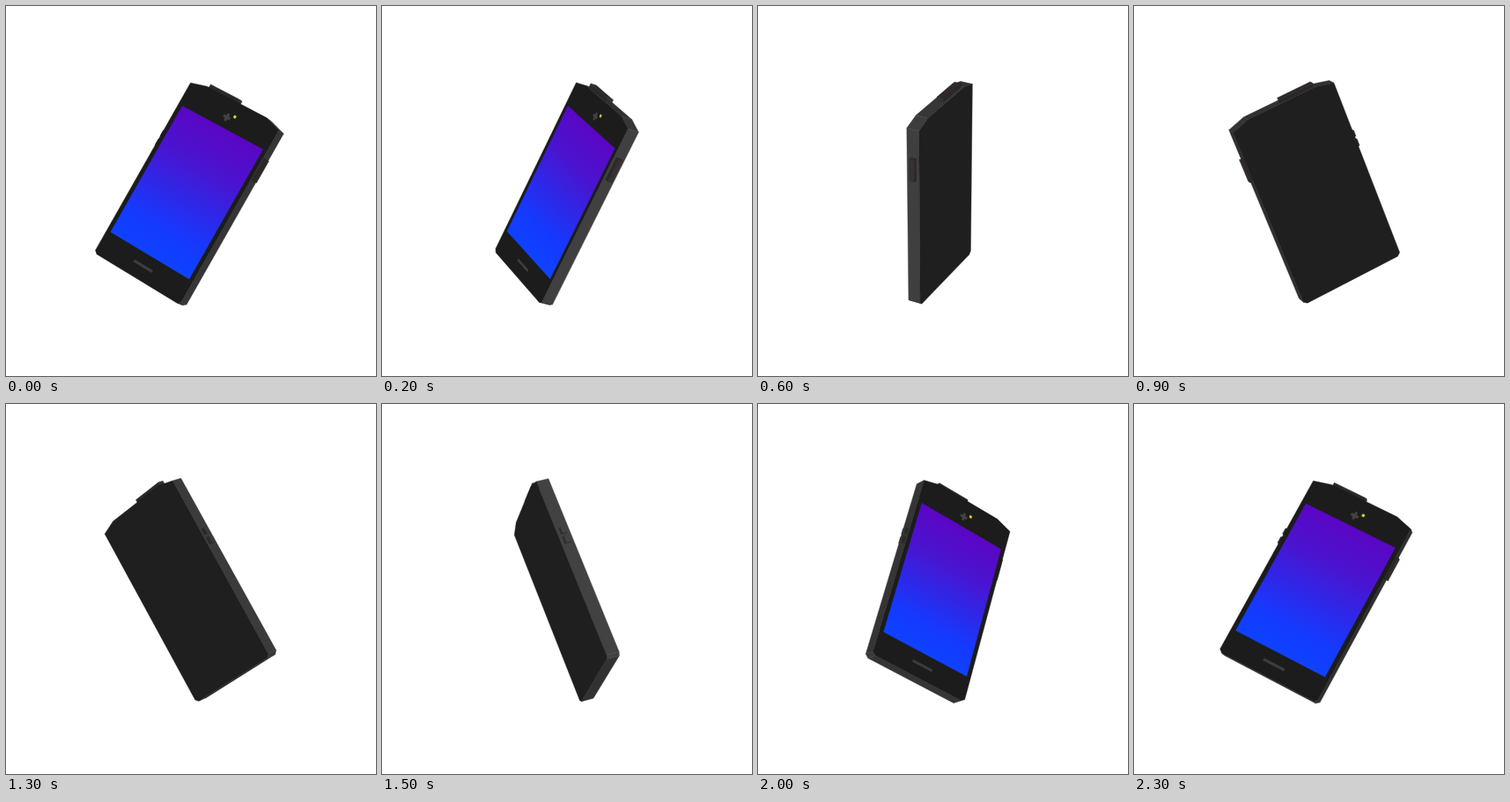
Write an HTML page with a canvas that moves like this. It is 420 px wide and 420 px high and loops after 2.4 s.

```html
<!DOCTYPE html>
<html lang="en">
<head>
<meta charset="utf-8">
<title>Rotating phone</title>
<style>
html, body { margin: 0; width: 100%; height: 100%; overflow: hidden; background: #fff; }
canvas { display: block; }
</style>
</head>
<body>
<canvas id="stage" width="420" height="420"></canvas>
<script>
const ctx = document.getElementById('stage').getContext('2d');
const LOOP = 2400, STEPS = 24;
const CX = 207, CY = 212, DIST = 1950, DEPTH = 7.5;
const ROLL = 29.6 * Math.PI / 180, YAW = 27.5 * Math.PI / 180;

// Phone axes: across, down, and front to back (z points away from the viewer).
const cr = Math.cos(ROLL), sr = Math.sin(ROLL);
const cy = Math.cos(YAW), sy = Math.sin(YAW);
const U = [cy * cr, cy * sr, -sy];
const V = [-sr, cr, 0];
const N = [sy * cr, sy * sr, cy];

const BODY = [[-64, -111], [-43, -116.3], [43, -116.3], [64, -110.4],
              [64, 110], [60, 113.2], [-60, 113.2], [-64, 110]];

const grey = nz => { const g = Math.round(40 + 30 * nz); return `rgb(${g},${g},${g})`; };
const warm = nz => { const g = Math.round(30 + 24 * nz); return `rgb(${g + 6},${g},${g})`; };

// Each button sits on the edge whose outward direction is `out`.
const BUTTONS = [
  { box: [63, -75, 67, -47.5], r: 3.2, out: [1, 0], shade: warm },
  { box: [-42, -120.5, 0, -116], r: 4, out: [0, -1], shade: warm },
  { box: [-66.8, -48, -63, -41], r: 3, out: [-1, 0], shade: grey },
  { box: [-66.8, -37, -63, -29], r: 3, out: [-1, 0], shade: grey }
];

let cos = 1, sin = 0;

const depthOf = v => -v[0] * sin + v[2] * cos;
const facing = (p, q) => -(p * depthOf(U) + q * depthOf(V));
const rect = (l, t, r, b) => [[l, t], [r, t], [r, b], [l, b]];

function project(p, q, r) {
  const [x, y, z] = [0, 1, 2].map(i => p * U[i] + q * V[i] + r * N[i]);
  const s = DIST / (DIST - x * sin + z * cos);
  return [CX + (x * cos + z * sin) * s, CY + y * s];
}

function area(pts) {
  return pts.reduce((sum, [x, y], i) => {
    const [nx, ny] = pts[(i + 1) % pts.length];
    return sum + x * ny - nx * y;
  }, 0);
}

function fill(pts, style) {
  ctx.beginPath();
  pts.forEach(([x, y]) => ctx.lineTo(x, y));
  ctx.closePath();
  ctx.fillStyle = ctx.strokeStyle = style;
  ctx.fill();
  ctx.stroke();
}

function face(pts, style) {
  if (area(pts) > 0) fill(pts, style);
}

function prism(shape, r, shade, front, back) {
  const near = shape.map(([p, q]) => project(p, q, -r));
  const far = shape.map(([p, q]) => project(p, q, r));
  shape.forEach(([p, q], i) => {
    const j = (i + 1) % shape.length;
    const dp = shape[j][0] - p, dq = shape[j][1] - q, len = Math.hypot(dp, dq);
    const nz = Math.max(0, facing(dq / len, -dp / len));
    face([near[j], near[i], far[i], far[j]], shade(nz));
  });
  face(near, front);
  face([...far].reverse(), back);
}

function flat(shape, style) {
  face(shape.map(([p, q]) => project(p, q, -DEPTH)), style);
}

function screenFill() {
  const a = project(0, -83.2, -DEPTH), b = project(0, 83.2, -DEPTH);
  const l = project(-58, 0, -DEPTH), r = project(58, 0, -DEPTH);
  // Run the gradient at a right angle to the projected rows.
  const len = Math.hypot(r[0] - l[0], r[1] - l[1]) || 1;
  const nx = -(r[1] - l[1]) / len, ny = (r[0] - l[0]) / len;
  const d = (b[0] - a[0]) * nx + (b[1] - a[1]) * ny;
  const g = ctx.createLinearGradient(a[0], a[1], a[0] + nx * d, a[1] + ny * d);
  g.addColorStop(0, '#5a06c4');
  g.addColorStop(0.3, '#4a14d0');
  g.addColorStop(0.8, '#143afe');
  g.addColorStop(1, '#0f42ff');
  return g;
}

function button({ box, r, shade }) {
  prism(rect(...box), r, shade, '#2b2828', '#2b2828');
}

function draw(angle) {
  cos = Math.cos(angle);
  sin = Math.sin(angle);
  ctx.fillStyle = '#fff';
  ctx.fillRect(0, 0, 420, 420);
  ctx.lineWidth = 0.4;
  ctx.lineJoin = 'round';

  const seen = b => facing(...b.out) > 0;
  BUTTONS.filter(b => !seen(b)).forEach(button);
  prism(BODY, DEPTH, grey, '#1c1c1c', '#1f1f1f');
  BUTTONS.filter(seen).forEach(button);

  flat(rect(-58.4, -83.2, 58.4, 83.2), screenFill());
  flat(rect(-5.5, -97.3, 3.5, -94.3), '#434343');
  flat(rect(-2.5, -100.3, 0.5, -91.3), '#434343');
  flat(rect(6.3, -101.8, 9.1, -99), '#e6d640');
  flat(rect(-13.5, 96, 13.5, 98.8), '#3d3d3d');
}

function tick(now) {
  const step = Math.floor((now % LOOP) / (LOOP / STEPS));
  draw(step / STEPS * Math.PI * 2);
  requestAnimationFrame(tick);
}

draw(0);
requestAnimationFrame(tick);
</script>
</body>
</html>
```
